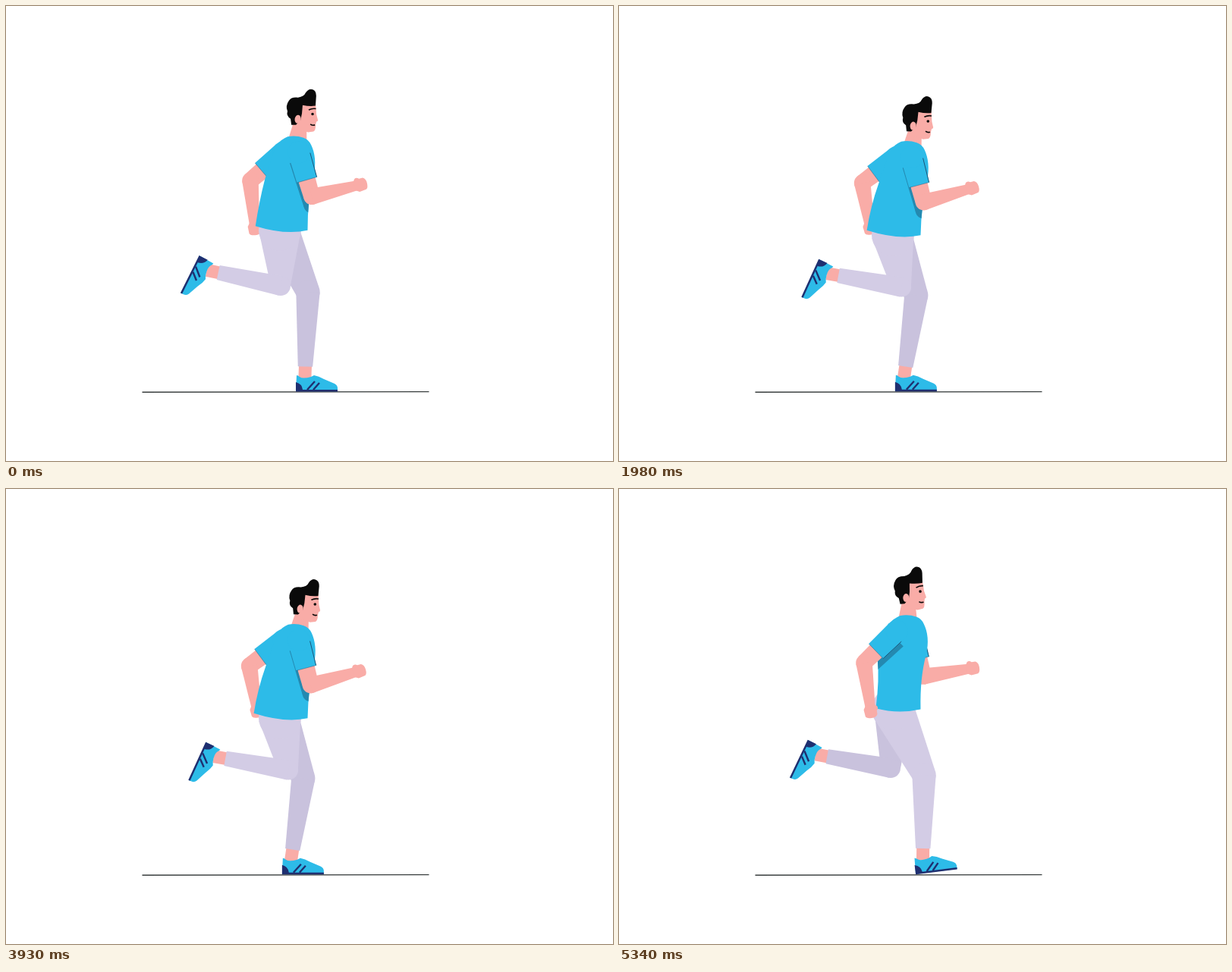
These frames come from a looping animation (800 by 600 pixels, 5.37 s). An HTML page with a canvas:

```html
<!DOCTYPE html>
<html lang="en">
<head>
<meta charset="utf-8">
<title>Runner</title>
<style>
  html, body { margin: 0; width: 100%; height: 100%; overflow: hidden; background: #fff; }
  canvas { display: block; }
</style>
</head>
<body>
<canvas id="stage" width="800" height="600"></canvas>
<script>
const ctx = document.getElementById('stage').getContext('2d');
const LOOP = 5370, STEP = 30, STRIDE = 975;
const SKIN = '#f9aca7', SHIRT = '#2dbbe8', SHADE = '#2489b0', SEAM = '#1b5478',
      NAVY = '#1f2f70', HAIR = '#0a0a0a', NEAR = '#d3cce5', FAR = '#c9c2dd';

// phase, knee x y, ankle x y, foot angle
const LEG = [
  [0, 362, 369, 267.5, 349, 116.6],
  [.115, 407, 374, 310, 385, 96.3],
  [.24, 436, 345, 402, 440, 40],
  [.365, 430, 335, 446, 442, -20],
  [.446, 405, 370, 411, 483, -12.5],
  [.477, 402, 377, 400.5, 486.5, -7],
  [.5, 398, 377, 394, 488, 0],
  [.56, 385, 388, 354, 487.5, 0],
  [.615, 368, 398, 311, 487, 0],
  [.74, 336, 371, 246, 432, 60],
  [.85, 343, 356, 239, 376, 95],
  [.946, 357, 364, 260, 353, 112],
  [.977, 358, 368, 262, 350.5, 115.6]
];
// phase, elbow x y, fist x y (without the body bounce)
const ARM = [
  [0, 403, 249, 468, 233],
  [.115, 390, 254, 452, 228],
  [.28, 358, 252, 414, 286],
  [.446, 328, 237, 337, 302],
  [.477, 323, 232, 332, 297],
  [.5, 322, 228, 328, 292],
  [.615, 318, 218, 354, 270],
  [.78, 354, 250, 408, 288],
  [.946, 397, 252, 464, 249],
  [.977, 401, 250, 467, 239]
];

const shoeBody = new Path2D('M-11 -1Q-9 -1 -7 1Q-3 4 8 1L12 -1Q18 0 25 4L39 10Q43 12 43 16V20H-12Z');
const shoeTrim = new Path2D('M-12 8Q-4 10 -3 18H43V20.5H-12Z');
const shoeStripes = new Path2D('M3 18L13 7M11 18L19 9');
const fist = new Path2D('M-9 -6L-7 -9Q-4 -11 -1 -8L4 -8Q8 -6 8 0Q8 7 5 8L-4 9L-9 6Z');
const neck = new Path2D('M-25 10L-31 29L-37 46H-8L-8 20Z');
const face = new Path2D('M-14 -14H4Q5 -4 5 0L7 8Q7 10 5 10L4 14Q4 22 1 23L-6 24L-18 20L-26 12Z');
const hair = new Path2D('M-28 14L-29 6Q-35 2 -33 -4Q-36 -11 -31 -18Q-28 -23 -19 -22Q-11 -23 -9 -28Q-5 -34 0 -32.5Q5 -31 5 -24L4 -11Q-4 -10 -13 -12L-14 -1L-16 8L-22 14Z');

// Periodic monotone cubic through the rows of a track.
function sample(rows, phase) {
  const p = phase - Math.floor(phase), n = rows.length;
  const at = (k, col) => {
    const turn = Math.floor(k / n);
    return rows[k - turn * n][col] + (col ? 0 : turn);
  };
  let i = n - 1;
  while (rows[i][0] > p) i--;
  const slope = (k, col) => (at(k + 1, col) - at(k, col)) / (at(k + 1, 0) - at(k, 0));
  const tangent = (k, col) => {
    const a = slope(k - 1, col), b = slope(k, col);
    return a * b <= 0 ? 0 : 2 * a * b / (a + b);
  };
  const h = at(i + 1, 0) - at(i, 0), s = (p - at(i, 0)) / h, s2 = s * s, s3 = s2 * s;
  return rows[0].slice(1).map((_, j) => {
    const col = j + 1;
    return (2 * s3 - 3 * s2 + 1) * at(i, col) + (3 * s2 - 2 * s3) * at(i + 1, col)
      + h * ((s3 - 2 * s2 + s) * tangent(i, col) + (s3 - s2) * tangent(i + 1, col));
  });
}

function dir(a, b) {
  const x = b[0] - a[0], y = b[1] - a[1], len = Math.hypot(x, y);
  return [x / len, y / len];
}
const along = (a, d, k) => [a[0] + d[0] * k, a[1] + d[1] * k];

// Tapered segment between two points, with optional round ends.
function taper(a, b, ra, rb, roundA, roundB) {
  const d = dir(a, b), n = [d[1], -d[0]];
  ctx.beginPath();
  ctx.moveTo(...along(a, n, ra));
  ctx.lineTo(...along(b, n, rb));
  ctx.lineTo(...along(b, n, -rb));
  ctx.lineTo(...along(a, n, -ra));
  ctx.fill();
  for (const [p, r, on] of [[a, ra, roundA], [b, rb, roundB]]) {
    if (!on) continue;
    ctx.beginPath();
    ctx.arc(p[0], p[1], r, 0, 7);
    ctx.fill();
  }
}

function placed(p, angle, draw) {
  ctx.save();
  ctx.translate(p[0], p[1]);
  ctx.rotate(angle);
  draw();
  ctx.restore();
}

function fill(path, color) {
  ctx.fillStyle = color;
  ctx.fill(path);
}

function leg(phase, bob, color, hipR) {
  const [kx, ky, ax, ay, turn] = sample(LEG, phase);
  const hip = [361, 293 + bob], knee = [kx, ky], ankle = [ax, ay];
  const thigh = dir(hip, knee), shin = dir(knee, ankle);
  const r = 13 + 3 * Math.max(0, thigh[0] * shin[0] + thigh[1] * shin[1]);
  const cuff = along(ankle, shin, -12.5);
  ctx.fillStyle = SKIN;
  taper(along(cuff, shin, -2), along(ankle, shin, 3), 8.5, 8.5);
  ctx.fillStyle = color;
  taper(hip, knee, hipR, r, true, true);
  taper(knee, cuff, r, 9.7);
  placed(ankle, turn * Math.PI / 180, () => {
    fill(shoeBody, SHIRT);
    fill(shoeTrim, NAVY);
    ctx.strokeStyle = NAVY;
    ctx.lineWidth = 2.4;
    ctx.stroke(shoeStripes);
  });
}

function armPose(phase, bob) {
  const [ex, ey, hx, hy] = sample(ARM, phase);
  return {
    shoulder: [376 + 10 * Math.cos(2 * Math.PI * phase), 190.5 + bob],
    elbow: [ex, ey + bob],
    hand: [hx, hy + bob]
  };
}

function bareArm({ shoulder, elbow, hand }, color) {
  const d = dir(elbow, hand);
  ctx.fillStyle = color;
  taper(shoulder, elbow, 12.5, 10.8, false, true);
  taper(elbow, along(hand, d, -6), 10.8, 6.5);
  placed(hand, Math.atan2(d[1], d[0]), () => fill(fist, color));
}

function sleeve({ shoulder, elbow }) {
  const d = dir(shoulder, elbow), n = [d[1], -d[0]], end = along(shoulder, d, 38);
  ctx.fillStyle = SHIRT;
  taper(shoulder, end, 14.5, 13.7, true);
  const front = along(end, n, 13.5);
  ctx.strokeStyle = SEAM;
  ctx.lineWidth = 1;
  ctx.beginPath();
  ctx.moveTo(...along(along(shoulder, d, 5), n, 14));
  ctx.lineTo(...front);
  ctx.stroke();
  ctx.globalAlpha = .45;
  ctx.beginPath();
  ctx.moveTo(...front);
  ctx.lineTo(...along(end, n, -13.5));
  ctx.stroke();
  ctx.globalAlpha = 1;
}

function shirtPath(b, c, bob) {
  const p = new Path2D(), left = 333.5 - 6 * b - 4 * c;
  const hemL = 288 + (left - 329) * .45 + bob;
  p.moveTo(371 + 2 * b, 170 + bob);
  p.quadraticCurveTo(382 + b, 168 + bob, 392 + b, 171.5 + bob);
  p.quadraticCurveTo(399 + b, 174 + bob, 402 + 1.5 * b, 181 + bob);
  p.bezierCurveTo(407 + b, 191 + bob, 409 + b, 205 + bob, 405 + 2 * b, 222 + bob);
  p.quadraticCurveTo(397 + 3 * b, 252 + bob, 397.5, 293.5 + bob);
  p.quadraticCurveTo(368, 300 + bob, left, hemL);
  p.quadraticCurveTo(left + 5, 255 + bob, 341 + 2 * b, 226 + bob);
  p.lineTo(355 + 4 * b, 182 + bob);
  p.quadraticCurveTo(363 + 2 * b, 173 + bob, 371 + 2 * b, 170 + bob);
  p.closePath();
  return p;
}

function head() {
  fill(face, SKIN);
  fill(hair, HAIR);
  ctx.fillStyle = SKIN;
  ctx.beginPath();
  ctx.ellipse(-19.5, 6.5, 4, 5.5, .15, 0, 7);
  ctx.fill();
  ctx.fillStyle = HAIR;
  ctx.beginPath();
  ctx.arc(0, 0, 1.8, 0, 7);
  ctx.fill();
  ctx.strokeStyle = HAIR;
  ctx.lineWidth = 1.7;
  ctx.beginPath();
  ctx.moveTo(-5, -5.5);
  ctx.quadraticCurveTo(0, -8, 4.5, -7);
  ctx.moveTo(-3, 13.3);
  ctx.quadraticCurveTo(0, 15.5, 3, 14.3);
  ctx.stroke();
}

function draw(t) {
  const u = t / STRIDE;
  const b = Math.sin(4 * Math.PI * (u - .49)), c = Math.cos(2 * Math.PI * u), bob = 18 * b;
  const eye = [400.7 + 9 * b + 2.2 * c, 139.3 + 25.8 * b];
  const tilt = (-3 + 4.5 * b + 2 * c) * Math.PI / 180;
  const nearArm = armPose(u, bob), farArm = armPose(u + .5, bob);

  ctx.fillStyle = '#fff';
  ctx.fillRect(0, 0, 800, 600);
  ctx.strokeStyle = '#3a3f3f';
  ctx.lineWidth = 1.4;
  ctx.beginPath();
  ctx.moveTo(179.5, 509.2);
  ctx.lineTo(557.5, 508.6);
  ctx.stroke();

  bareArm(farArm, SKIN);
  sleeve(farArm);
  leg(u + .5, bob, FAR, 25);
  leg(u, bob, NEAR, 28);
  placed(eye, tilt, () => fill(neck, SKIN));

  const shirt = shirtPath(b, c, bob);
  fill(shirt, SHIRT);
  ctx.save();
  ctx.clip(shirt);
  ctx.translate(0, 11);
  bareArm(nearArm, SHADE);
  ctx.restore();

  placed(eye, tilt, head);
  bareArm(nearArm, SKIN);
  sleeve(nearArm);
}

const start = performance.now();
function tick() {
  const t = (performance.now() - start) % LOOP;
  draw(Math.floor(t / STEP) * STEP);
  requestAnimationFrame(tick);
}
tick();
</script>
</body>
</html>
```
